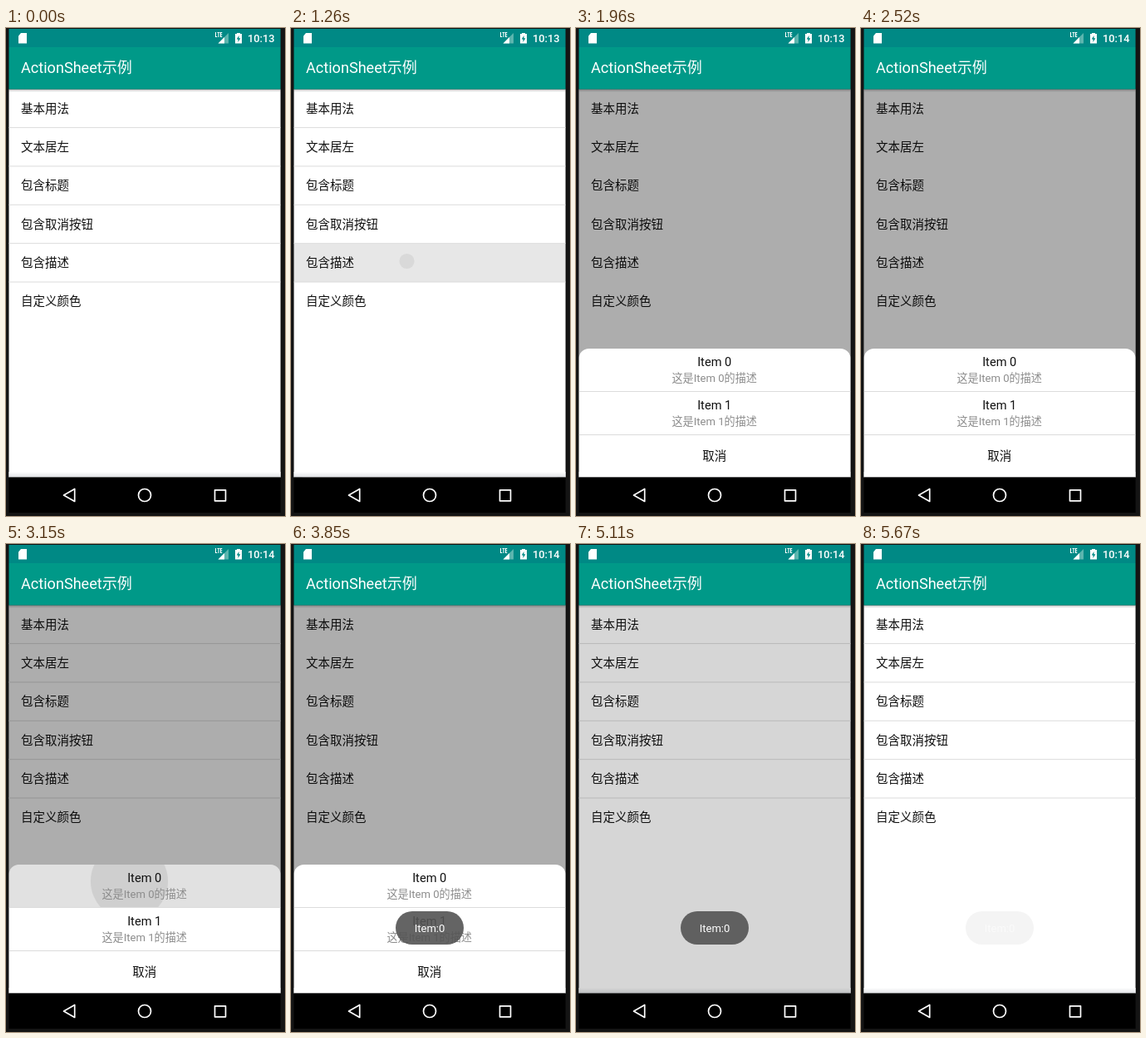
Animation, 336 px wide and 586 px high, one loop 5.74 s. Source, as an HTML page with a canvas:

```html
<!DOCTYPE html>
<html lang="zh-CN">
<head>
<meta charset="utf-8">
<title>ActionSheet示例</title>
<style>
  html, body { margin: 0; width: 100%; height: 100%; overflow: hidden; background: #141414; }
  canvas { display: block; width: 336px; height: 586px; }
</style>
</head>
<body>
<canvas id="stage"></canvas>
<script>
const W = 336, H = 586, LOOP = 5740;
const LEFT = 3.5, RIGHT = 330.6, WIDTH = RIGHT - LEFT;
const LIST_TOP = 73.5, NAV_TOP = 539.5, ROW = 46.35, SHEET_TOP = 385, SHEET_H = NAV_TOP - SHEET_TOP;
const STATUS = '#008985';
const FONT = "Roboto, 'Noto Sans CJK SC', 'Noto Sans CJK', sans-serif";
const LABELS = ['基本用法', '文本居左', '包含标题', '包含取消按钮', '包含描述', '自定义颜色'];

const canvas = document.getElementById('stage');
const ctx = canvas.getContext('2d');
const dpr = window.devicePixelRatio || 1;
canvas.width = W * dpr;
canvas.height = H * dpr;

const clamp = x => Math.max(0, Math.min(1, x));
const ramp = (t, from, to) => clamp((t - from) / (to - from));
const smooth = x => x * x * (3 - 2 * x);
const during = (t, from, to) => t >= from && t < to;

function rect(x, y, w, h, color) {
  ctx.fillStyle = color;
  ctx.fillRect(x, y, w, h);
}

function poly(points, color) {
  ctx.beginPath();
  points.forEach(([x, y]) => ctx.lineTo(x, y));
  ctx.closePath();
  if (color) {
    ctx.fillStyle = color;
    ctx.fill();
  }
}

function text(str, x, y, size, color, align = 'left', weight = 400) {
  ctx.font = `${weight} ${size}px ${FONT}`;
  ctx.textAlign = align;
  ctx.fillStyle = color;
  ctx.fillText(str, x, y);
}

// Touch feedback: a tinted row with a growing circle, both fading after release
function ripple(age, cx, cy, top, height) {
  if (age < 0 || age >= 560) return;
  const fade = age < 210 ? clamp((age + 40) / 140) : (1 - (age - 210) / 350) ** 2;
  ctx.save();
  ctx.beginPath();
  ctx.rect(LEFT, top, WIDTH, height);
  ctx.clip();
  rect(LEFT, top, WIDTH, height, `rgba(0,0,0,${0.12 * fade})`);
  ctx.beginPath();
  ctx.arc(cx, cy, 0.0152 * age ** 1.5, 0, Math.PI * 2);
  ctx.fillStyle = `rgba(0,0,0,${0.08 * fade})`;
  ctx.fill();
  ctx.restore();
}

function drawList(t) {
  rect(LEFT, LIST_TOP, WIDTH, NAV_TOP - LIST_TOP, '#fff');
  const lines = !during(t, 1820, 2940) && !during(t, 3500, 4690);
  ripple(t - 1190, 139.5, 280, LIST_TOP + 4 * ROW, ROW);
  LABELS.forEach((label, i) => {
    text(label, 18, 101.6 + i * ROW, 14.5, '#111');
    if (lines && i < 5) rect(LEFT, 119.1 + i * ROW, WIDTH, 1, '#dcdcdc');
  });
  const glow = ctx.createLinearGradient(0, 533, 0, NAV_TOP);
  glow.addColorStop(0, '#fff');
  glow.addColorStop(1, '#dfe1e4');
  rect(LEFT, 533, WIDTH, NAV_TOP - 533, glow);
  const shade = ctx.createLinearGradient(0, LIST_TOP, 0, LIST_TOP + 3.5);
  shade.addColorStop(0, 'rgba(0,0,0,.25)');
  shade.addColorStop(1, 'rgba(0,0,0,0)');
  rect(LEFT, LIST_TOP, WIDTH, 3.5, shade);
}

function drawSheet(t) {
  const shown = smooth(ramp(t, 1260, 1470)) - smooth(ramp(t, 4881, 5101));
  if (shown <= 0) return;
  ctx.save();
  ctx.beginPath();
  ctx.rect(LEFT, LIST_TOP, WIDTH, NAV_TOP - LIST_TOP);
  ctx.clip();
  ctx.translate(0, SHEET_H * (1 - shown));
  ctx.beginPath();
  ctx.roundRect(LEFT, SHEET_TOP, WIDTH, SHEET_H, [12, 12, 0, 0]);
  ctx.fillStyle = '#fff';
  ctx.fill();
  ctx.clip();
  ripple(t - 2940, 148.5, 405, SHEET_TOP, 51);
  ripple(t - 4690, 167, 514, 488, 51.5);
  for (let i = 0; i < 2; i++) {
    const y = i * 52;
    text(`Item ${i}`, 166.7, 406.3 + y, 14.6, '#111', 'center');
    text(`这是Item ${i}的描述`, 166.7, 425.4 + y, 13.1, '#8c8c8c', 'center');
    rect(LEFT, 436 + y, WIDTH, 1, '#dcdcdc');
  }
  text('取消', 166.7, 519.2, 14.5, '#111', 'center');
  ctx.restore();
}

function drawToast(t) {
  const alpha = ramp(t, 3500, 3850) * (1 - 0.93 * ramp(t, 5250, 5670));
  if (alpha <= 0) return;
  ctx.save();
  ctx.globalAlpha = alpha;
  ctx.beginPath();
  ctx.roundRect(126, 441, 82, 40, 20);
  ctx.fillStyle = 'rgba(84,84,84,.9)';
  ctx.fill();
  // the label stays legible longer than its pill
  ctx.globalAlpha = alpha ** 0.2;
  text('Item:0', 167, 466.3, 13, '#fff', 'center');
  ctx.restore();
}

function drawStatusIcons() {
  // memory card
  poly([[18, 6], [25, 6], [25, 18.5], [15, 18.5], [15, 9.5]], '#fff');

  // signal
  poly([[268, 6], [268, 18.5], [255.5, 18.5]], '#5cb5ae');
  poly([[263, 11], [263, 18.5], [255.5, 18.5]], '#fff');

  // network badge
  rect(252, 5, 1, 6, '#fff');
  rect(252, 10, 2.3, 1, '#fff');
  rect(254.5, 5, 3, 1, '#fff');
  rect(255.5, 5, 1, 6, '#fff');
  rect(258, 5, 1, 6, '#fff');
  [5, 7.5, 10].forEach(y => rect(258, y, 2.3, 1, '#fff'));

  // battery
  rect(278, 6, 4, 2, '#fff');
  rect(276, 7, 8, 11.5, '#fff');
  poly([[280.6, 9], [277.7, 13.4], [279.6, 13.4], [279.4, 17], [282.4, 12.2], [280.4, 12.2]], STATUS);
}

function drawBars(t) {
  rect(LEFT, 1, WIDTH, 22, STATUS);
  rect(LEFT, 23, WIDTH, LIST_TOP - 23, '#009988');
  text('ActionSheet示例', 18, 54, 18.1, '#fff');
  text(t < 2240 ? '10:13' : '10:14', 291, 17, 12.8, '#fff', 'left', 500);
  drawStatusIcons();

  rect(LEFT, NAV_TOP, WIDTH, 42.5, '#000');
  ctx.strokeStyle = '#fff';
  ctx.lineWidth = 1.7;
  ctx.lineJoin = 'round';
  poly([[69.5, 561], [82.7, 553.5], [82.7, 568.5]]);
  ctx.stroke();
  ctx.beginPath();
  ctx.arc(167, 561, 7.5, 0, Math.PI * 2);
  ctx.stroke();
  ctx.strokeRect(251.5, 554.8, 13, 13);
}

function draw(t) {
  ctx.setTransform(dpr, 0, 0, dpr, 0, 0);
  rect(0, 0, W, H, '#141414');
  drawList(t);
  const dim = 0.32 * (ramp(t, 1260, 1560) - ramp(t, 4970, 5250));
  if (dim > 0) rect(LEFT, LIST_TOP, WIDTH, NAV_TOP - LIST_TOP, `rgba(0,0,0,${dim})`);
  drawSheet(t);
  drawBars(t);
  drawToast(t);
}

const start = performance.now();
function tick() {
  draw((performance.now() - start) % LOOP);
  requestAnimationFrame(tick);
}
tick();
</script>
</body>
</html>
```
